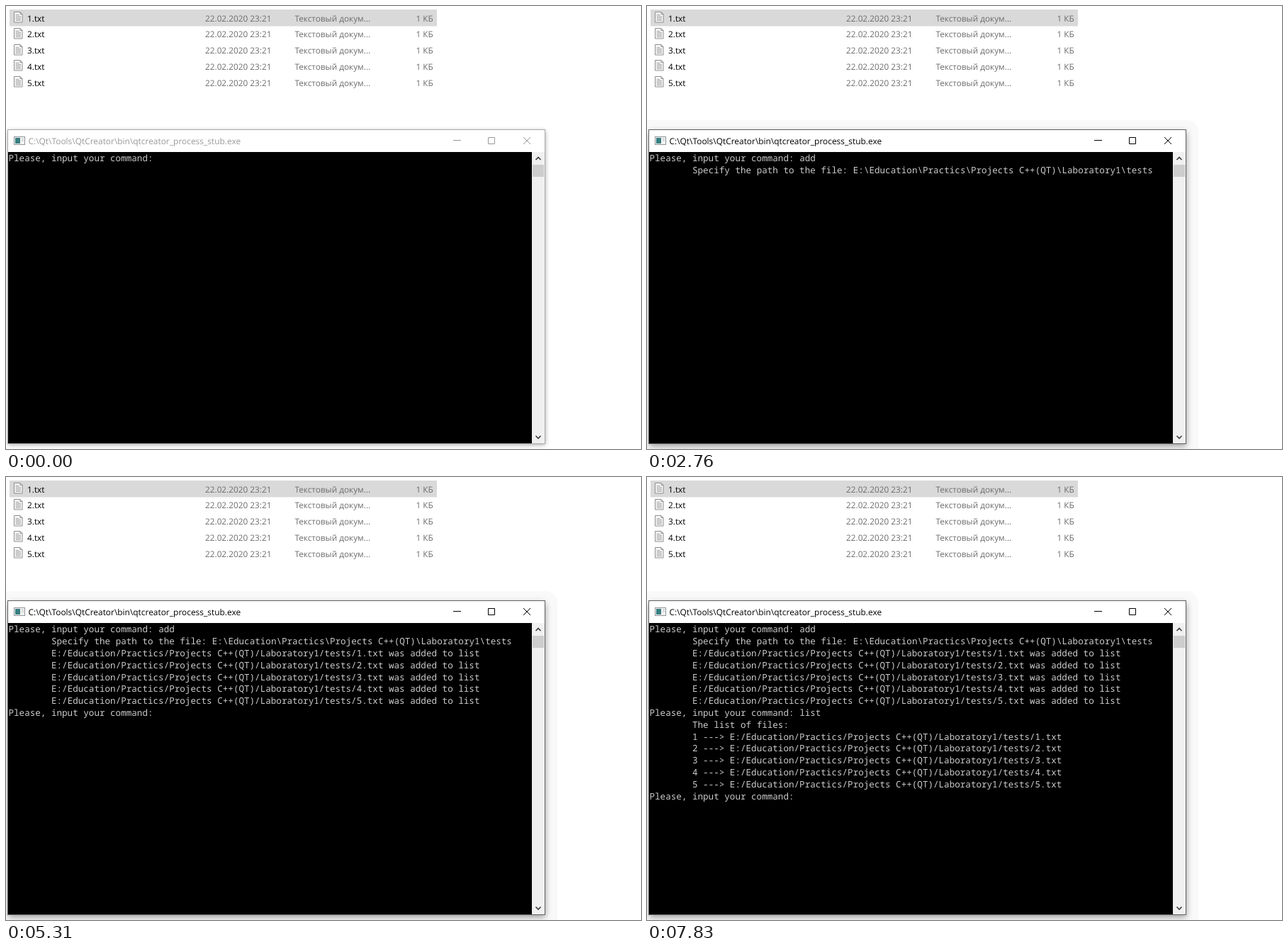
Write an HTML page that moves like this. It is 896x625 px and loops after 8000 ms.

```html
<!DOCTYPE html>
<html lang="ru">
<head>
<meta charset="utf-8">
<title>Console session</title>
<style>
html, body { margin: 0; width: 100%; height: 100%; overflow: hidden; background: #fff; }
svg { display: block; text-rendering: geometricPrecision; }
.ui { font: 11.8px "Open Sans", "Noto Sans", sans-serif; }
#title { font-size: 11.93px; }
.mono { font: 500 12.6px "Noto Sans Mono", "DejaVu Sans Mono", monospace; fill: #ccc; }
</style>
</head>
<body>
<svg id="stage" width="896" height="625" viewBox="0 0 896 625">
  <defs>
    <filter id="soft" x="-10%" y="-10%" width="120%" height="120%"><feGaussianBlur stdDeviation="3"/></filter>
    <filter id="wide" x="-10%" y="-10%" width="120%" height="120%"><feGaussianBlur stdDeviation="5"/></filter>
    <g id="page">
      <path d="M.5 .5h8.5l3 3v11.5h-11.5z" fill="#fafafa" stroke="#8c8c8c"/>
      <path d="M9 .5v3h3" fill="none" stroke="#8c8c8c"/>
      <path d="M2.5 4.5h5M2.5 6.5h7.5M2.5 8.5h7.5M2.5 10.5h7.5M2.5 12.5h7.5" stroke="#a0a0a0"/>
    </g>
  </defs>

  <rect x="5" y="5" width="603" height="23.5" fill="#d9d9d9"/>
  <g id="files" class="ui"></g>

  <rect id="idleShadow" x="3" y="176" width="758" height="443" opacity=".35" filter="url(#soft)"/>
  <g id="activeShadow">
    <rect x="-30" y="161" width="808" height="500" rx="16" fill="#f9f9f9"/>
    <rect x="3" y="178" width="758" height="443" opacity=".38" filter="url(#wide)"/>
  </g>

  <rect x="3" y="175" width="757" height="443" fill="#fff"/>
  <g>
    <rect x="11.5" y="184.5" width="15" height="11" fill="#f4f4f4" stroke="#8e9499"/>
    <rect x="13" y="186" width="7" height="8" fill="#397f80"/>
    <path d="M22 187.5h3M22 190h3" stroke="#b5b9bc"/>
  </g>
  <text id="title" class="ui" x="31.5" y="195">C:\Qt\Tools\QtCreator\bin\qtcreator_process_stub.exe</text>
  <rect id="hover" x="711" y="175" width="49" height="30" fill="#e81123"/>
  <path id="buttons" d="M631 189.5h11M680.5 185.5h9v9h-9zM730 185l10 10M740 185l-10 10" fill="none"/>

  <rect x="3" y="206" width="739" height="411"/>
  <rect x="742" y="206" width="18" height="411" fill="#f0f0f0"/>
  <rect x="743" y="224" width="16" height="17" fill="#cdcdcd"/>
  <path d="M747.5 217l3.5-3.5 3.5 3.5M747.5 606.5l3.5 3.5 3.5-3.5" fill="none" stroke="#404040" stroke-width="1.7"/>
  <g id="console" class="mono"></g>
  <rect id="cursor" width="7.5" height="4.2" fill="#fff"/>
  <rect id="frame" x="2.5" y="174.5" width="758" height="443" fill="none"/>
</svg>

<script>
const LOOP = 8000, CELL = 7.56, LINE = 16.8, LEFT = 3.5;
const $ = id => document.getElementById(id);
const prompt = 'Please, input your command:';
const dir = 'E:/Education/Practics/Projects C++(QT)/Laboratory1/tests';
const numbers = [1, 2, 3, 4, 5];

$('files').innerHTML = numbers.map((n, i) => {
  const y = 21.6 + i * 22.75;
  return `<use href="#page" x="11" y="${Math.round(y - 13.5)}"/>
    <text x="30" y="${y}">${n}.txt</text>
    <g fill="#6d6d6d"><text x="281" y="${y}">22.02.2020 23:21</text>
    <text x="407.5" y="${y}">Текстовый докум...</text>
    <text x="578.5" y="${y}">1 КБ</text></g>`;
}).join('');

// Console output: time, row, column, text
const output = [
  [0, 0, 0, prompt],
  [1140, 0, 28, 'a'], [1200, 0, 29, 'd'], [1260, 0, 30, 'd'],
  [1920, 1, 8, 'Specify the path to the file:'],
  [2670, 1, 38, dir.replaceAll('/', '\\')],
  ...numbers.map(n => [4470, n + 1, 8, `${dir}/${n}.txt was added to list`]),
  [4470, 7, 0, prompt],
  [6030, 7, 28, 'l'], [6270, 7, 29, 'i'], [6330, 7, 30, 's'], [6450, 7, 31, 't'],
  [6990, 8, 8, 'The list of files:'],
  ...numbers.map(n => [n < 3 ? 6990 : 7020, n + 8, 8, `${n} ---> ${dir}/${n}.txt`]),
  [7080, 14, 0, prompt]
];

// Cursor: time, row, column; hidden when only a time is given
const cursorSteps = [
  [0], [1140, 0, 29], [1200, 0, 30], [1260, 0, 31], [1770],
  [1920, 1, 38], [2670, 1, 94], [2760], [3300, 1, 94], [3810], [4320, 1, 94],
  [4380, 2, 0], [4470, 7, 28], [5310], [5820, 7, 28],
  [6030, 7, 29], [6270, 7, 30], [6330, 7, 31], [6450, 7, 32], [6840],
  [6960, 8, 0], [6990, 11, 0], [7020, 14, 0], [7080, 14, 28], [7830]
];
const hoverSteps = [[0, 0], [150, .9], [180, .6], [210, .3], [240, 0]];

const runs = output.map(([time, row, col, text]) => {
  const node = document.createElementNS('http://www.w3.org/2000/svg', 'text');
  node.setAttribute('x', LEFT + col * CELL);
  node.setAttribute('y', 219.4 + row * LINE);
  node.textContent = text;
  $('console').append(node);
  return { time, node };
});

const latest = (steps, t) => steps.findLast(step => step[0] <= t);
const show = (node, on) => node.setAttribute('visibility', on ? 'visible' : 'hidden');

function draw(t) {
  const active = t >= 780;
  show($('idleShadow'), !active);
  show($('activeShadow'), active);
  $('title').setAttribute('fill', active ? '#000' : '#999');
  $('buttons').setAttribute('stroke', active ? '#000' : '#999');
  $('frame').setAttribute('stroke', active ? '#606060' : '#aaa');
  $('hover').setAttribute('opacity', latest(hoverSteps, t)[1]);

  for (const { time, node } of runs) show(node, t >= time);

  const [, row, col] = latest(cursorSteps, t);
  show($('cursor'), row !== undefined);
  if (row !== undefined) {
    $('cursor').setAttribute('x', LEFT + col * CELL);
    $('cursor').setAttribute('y', 219 + row * LINE);
  }
}

const start = performance.now();
function tick() {
  draw((performance.now() - start) % LOOP);
  requestAnimationFrame(tick);
}
tick();
</script>
</body>
</html>
```
